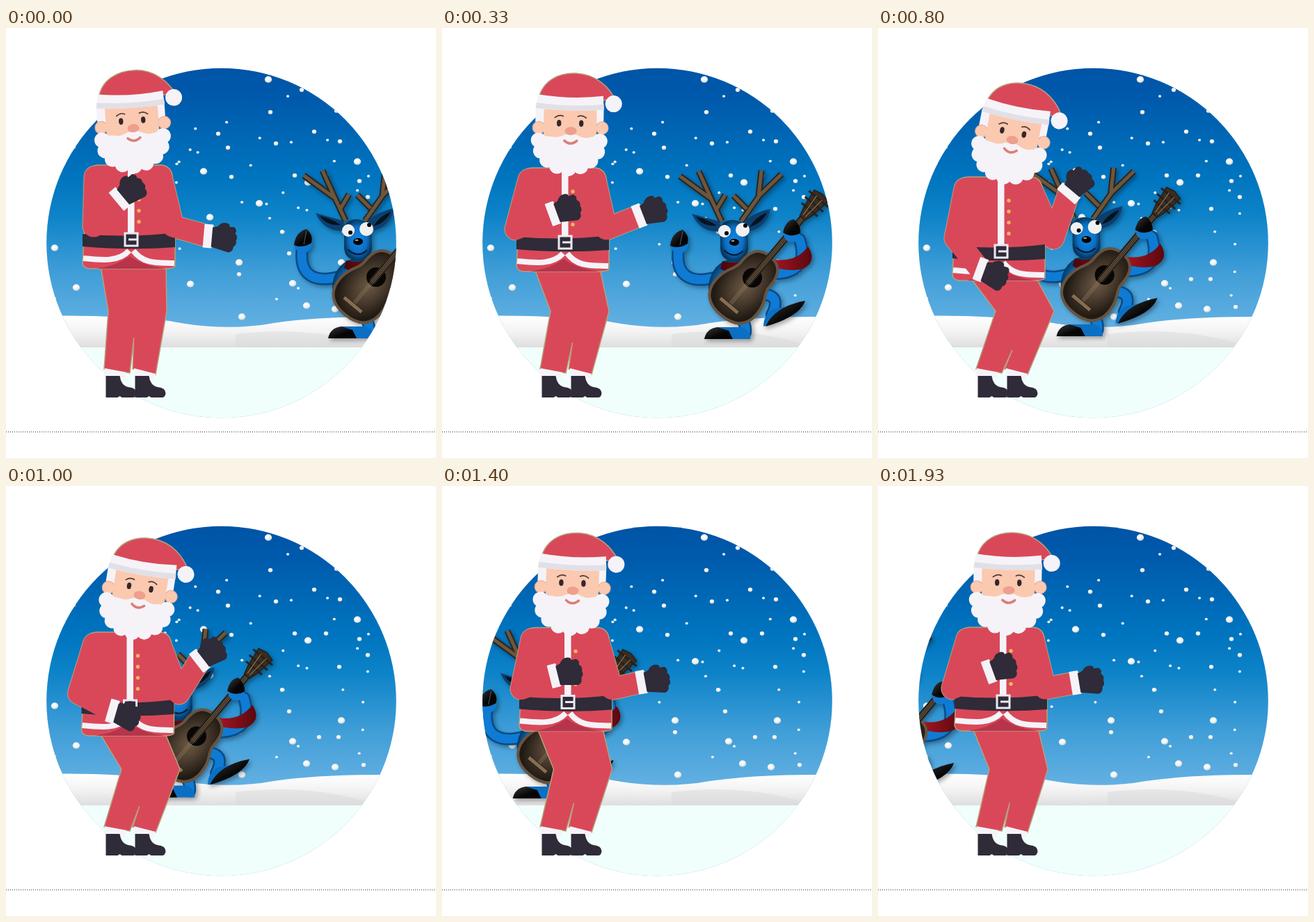
Write an HTML page that moves like this. It is 618 px wide and 618 px high and loops after 2.07 s.

```html
<!DOCTYPE html>
<html lang="en">
<head>
<meta charset="utf-8">
<title>Winter dance</title>
<style>
  html, body { margin: 0; width: 100%; height: 100%; overflow: hidden; background: #fff; }
  svg { display: block; width: 100vw; height: 100vh; }
  .line { fill: none; stroke-linecap: round; stroke-linejoin: round; }
  .butt { stroke-linecap: butt; }
  .red { fill: #d94859; }
  .dark { fill: #2f2b38; }
  .white { fill: #f5f3f8; }
  .edge { stroke: #b5a27c; stroke-width: 1.5; }
  .skin { fill: #fbc9b0; }
</style>
</head>
<body>
<svg viewBox="0 0 618 618">
  <defs>
    <clipPath id="disc"><circle cx="309.5" cy="309" r="251.3"/></clipPath>
    <linearGradient id="sky" gradientUnits="userSpaceOnUse" x1="0" y1="58" x2="0" y2="430">
      <stop offset="0" stop-color="#0054a6"/><stop offset=".12" stop-color="#005aac"/>
      <stop offset=".42" stop-color="#0075bf"/><stop offset=".56" stop-color="#0c82c8"/>
      <stop offset=".8" stop-color="#429fd8"/><stop offset="1" stop-color="#63b0e2"/>
    </linearGradient>
    <linearGradient id="hill" gradientUnits="userSpaceOnUse" x1="0" y1="414" x2="0" y2="459">
      <stop offset="0" stop-color="#fff"/><stop offset=".5" stop-color="#f3f3f3"/><stop offset="1" stop-color="#dedede"/>
    </linearGradient>
    <radialGradient id="flake" cx=".4" cy=".35" r=".65">
      <stop offset="0" stop-color="#fff"/><stop offset=".6" stop-color="#f2f2f0"/><stop offset="1" stop-color="#c9d3da"/>
    </radialGradient>
    <radialGradient id="fur">
      <stop offset="0" stop-color="#1687e6"/><stop offset=".65" stop-color="#0b6fc4"/><stop offset="1" stop-color="#05375f"/>
    </radialGradient>
    <radialGradient id="wood">
      <stop offset="0" stop-color="#6d5a45"/><stop offset=".5" stop-color="#4a3c2e"/><stop offset="1" stop-color="#211a14"/>
    </radialGradient>
    <linearGradient id="scarf"><stop offset="0" stop-color="#4a060c"/><stop offset=".6" stop-color="#a01420"/><stop offset="1" stop-color="#5a0810"/></linearGradient>
    <linearGradient id="hoof" x2="1" y2="1"><stop offset="0" stop-color="#3a3a3c"/><stop offset=".6" stop-color="#050505"/></linearGradient>
    <g id="glove">
      <rect class="white" x="-6" y="-17" width="13" height="34" rx="1"/>
      <path class="dark" d="M6-13L13-15Q18-22 25-21Q31-20 30-16L37-16Q42-12 39-7Q44-3 41 3Q43 9 38 12Q38 20 31 21L6 15Z"/>
    </g>
    <path id="boot" class="dark" d="M0 0H20Q22 14 32 16Q44 17 44 25Q43 31 39 31H23L20 29L17 31H0Z"/>
    <path id="horns" d="M-18-30L-32-60L-51-102M-78-95L-34-63M-13-68L-25-48M10-30L36-67L68-98M39-103L35-66M-1-67L18-48"/>
    <path id="limbs" d="M-80 8C-86 50-62 60-25 50M62 45Q108 42 94-4M42 75Q68 76 54 104M-6 100Q18 108 16 130"/>
  </defs>

  <g clip-path="url(#disc)">
    <rect width="618" height="618" fill="url(#sky)"/>
    <g id="snow" fill="url(#flake)"></g>
    <path d="M50 414C120 412 180 416 235 421Q315 437 385 424C450 415 510 415 570 415V470H50Z" fill="url(#hill)"/>
    <path d="M330 440Q430 428 515 453L520 459H330Z" fill="#d8d8d8" opacity=".45"/>
    <rect y="459" width="618" height="110" fill="#f1fffc"/>
    <g id="deer" style="filter:drop-shadow(3px 3px 3px rgba(0,0,0,.35))">
      <g class="line butt">
        <use href="#horns" stroke="#2e241b" stroke-width="9"/>
        <use href="#horns" stroke="#6b563f" stroke-width="5"/>
      </g>
      <path d="M-61-41Q-47-37-22-30L-16-16Q-48-12-61-41ZM52-48Q46-20 18-15L14-30Q28-43 52-48Z" fill="#0b3f70"/>
      <path d="M-55-37Q-36-32-25-24Q-45-22-55-37ZM47-43Q40-27 22-22Q30-36 47-43Z" fill="#06131f"/>
      <g class="line">
        <use href="#limbs" stroke="#084a86" stroke-width="18"/>
        <use href="#limbs" stroke="#0f7bd4" stroke-width="13"/>
      </g>
      <ellipse cx="-1" cy="66" rx="36" ry="42" fill="url(#fur)"/>
      <path d="M40 20Q84 36 106 6Q120 27 99 38Q76 44 46 32ZM-17 27Q0 32 20 24L28 40Q0 50-20 38Z" fill="url(#scarf)"/>
      <path d="M-43 139Q-40 124-22 122H12Q25 128 23 139ZM42 121Q42 104 56 96L72 93L68 112Z" fill="#0b6fc4"/>
      <path d="M-43 139Q-40 124-24 122L-8 127L-2 139Z" fill="url(#hoof)"/>
      <path d="M45 121Q58 92 102 84Q94 107 45 121Z" fill="url(#hoof)"/>
      <path d="M-20-22Q-15-32-4-32Q14-32 19-18L20 10Q18 27 0 27Q-20 26-20 8Z" fill="url(#fur)"/>
      <g fill="#f0f0f0"><circle cx="-14" cy="-16" r="9"/><circle cx="12" cy="-18" r="10"/></g>
      <circle cx="-11" cy="-13" r="3"/><circle cx="16" cy="-24" r="3"/>
      <ellipse rx="7" ry="5"/><ellipse cx="-2" cy="-2" rx="2.5" ry="1.2" fill="#999"/>
      <path class="line" d="M-14 12Q0 24 12 13" stroke="#03182c" stroke-width="2"/>
      <g transform="translate(26 51) rotate(-50)">
        <path d="M-70 0C-70-36-46-40-30-38C-10-36-8-27 6-27C30-28 40-18 40 0C40 18 30 28 6 27C-8 27-10 36-30 38C-46 40-70 36-70 0Z" fill="url(#wood)" stroke="#675440" stroke-width="4"/>
        <circle r="14" fill="#080706"/>
        <path d="M-10-5H116V5H-10Z" fill="#2b2119"/>
        <path d="M-52-2H150M-52 0H116M-52 2H150" stroke="#8f7a5d" stroke-width=".8"/>
        <rect x="-55" y="-17" width="6" height="34" fill="#856e52" stroke="#2a2018"/>
        <path d="M112-5L126-9L154-13L157 0L154 13L126 9L112 5Z" fill="#392c20" stroke="#1c150f"/>
        <path d="M128-15V15M138-17V17M148-18V18" stroke="#2a2018" stroke-width="3"/>
        <path d="M116-2L150-5M116 2L150 5" stroke="#8f7a5d"/>
      </g>
      <g fill="#1079d0"><circle cx="-79" cy="3" r="13"/><circle cx="83" cy="-12" r="12"/></g>
      <path d="M-92 5Q-90-14-74-18Q-64-10-67 2Q-80 10-92 5Z" fill="url(#hoof)"/>
      <path d="M-78 4L-74-16" stroke="#4e5d69"/>
      <path d="M70-14Q74-32 86-33Q96-24 95-13Q82-6 70-14Z" fill="url(#hoof)"/>
    </g>
  </g>
  <path d="M0 580.5H618" stroke="#333" stroke-dasharray="1 2"/>

  <path id="legs" class="red edge"/>
  <path class="white" d="M142 489L173 495L171 504L140 501ZM184 489L215 497L212 505L184 501Z"/>
  <use href="#boot" x="143.5" y="500"/><use href="#boot" x="185.5" y="500"/>
  <path id="armsEdge" class="line" stroke="#b5a27c" stroke-width="33"/>
  <g id="coat">
    <path class="red edge" d="M-66-90Q-63-107-46-107H44Q57-105 59-92L63-30V38Q61 42 50 42H-60Q-69 41-70 34L-67-20Z"/>
    <path d="M-50 42Q-22 38-2 24Q18 38 50 42Z" fill="#b7344b"/>
    <path class="line butt" d="M-69 27C-40 30-18 32-3 16M3 16C18 36 38 33 62 34" stroke="#f5f3f8" stroke-width="8"/>
    <rect class="white" x="-5" y="-106" width="9.5" height="96"/>
    <path class="dark" d="M-70-8Q0-2 63-10V11Q0 16-70 10Z"/>
    <g stroke="#ebe9ef" stroke-width="3">
      <rect class="dark" x="-9" y="-9" width="18" height="18"/>
      <path d="M-4 0H8"/>
    </g>
    <path class="line" d="M11-73V-25" stroke="#f1b55f" stroke-width="5.4" stroke-dasharray="0 15.8"/>
  </g>
  <path id="arms" class="line" stroke="#d94859" stroke-width="31"/>
  <use id="handL" href="#glove"/><use id="handR" href="#glove"/>
  <g id="head">
    <path class="white" d="M-51-36H47V-10H-51Z"/>
    <g class="skin" stroke="#e7a58f"><circle cx="-46" cy="-4" r="9"/><circle cx="45" cy="-5" r="9"/></g>
    <path class="skin" d="M-39-34H37V20H-39Z"/>
    <g id="beard" class="white"></g>
    <path class="skin" d="M-38-10H36V4Q24 14 10 6L0 3L-10 6Q-24 14-38 3Z"/>
    <path class="line" d="M-9 14Q0 22 9 14" stroke="#dc7f76" stroke-width="3.5"/>
    <ellipse rx="8.5" ry="6" fill="#ee9f8d"/>
    <path class="line" d="M-23-19Q-17-24-11-21M10-21Q16-24 22-19" stroke="#4c3b3d" stroke-width="1.7"/>
    <g id="eyesOpen" fill="#34272b"><ellipse cx="-17" cy="-11" rx="3.2" ry="4.7"/><ellipse cx="15" cy="-11" rx="3.2" ry="4.7"/></g>
    <path id="eyesShut" class="line" d="M-22-11Q-17-8-12-11M11-11Q16-8 21-11" stroke="#34272b" stroke-width="1.8"/>
    <path class="red edge" d="M-47-46C-41-73-17-84 8-83C34-82 54-65 64-45H45Z"/>
    <path class="white" d="M-48-52Q0-45 46-51L47-31Q0-27-51-32Z"/>
    <path d="M-50-40Q0-34 47-39V-31Q0-27-51-32Z" fill="#e1e0e6"/>
    <circle class="white" cx="61" cy="-40" r="12"/>
  </g>
</svg>
<script>
const $ = id => document.getElementById(id);
const DURATION = 2070, LAST_STEP = 29;

const flake = (x, y, r) => `<ellipse cx="${x}" cy="${y}" rx="${r}" ry="${r * .9}"/>`;
const pairs = (list, r) => list.map((x, i) => i % 2 ? '' : flake(x, list[i + 1], r)).join('');

const large = [377,74, 284,206, 434,222, 364,252, 505,192, 70,316, 482,337, 101,373, 265,368,
  412,367, 432,399, 473,404, 339,415, 293,272, 335,337];
const medium = [425,89, 380,121, 443,149, 388,166, 319,172, 460,212, 520,243, 479,260, 397,293,
  415,212, 480,163, 475,119, 478,361, 335,354, 450,361, 407,324, 305,152, 324,214, 508,220, 514,401];

let seed = 7;
const random = () => (seed = seed * 16807 % 2147483647) / 2147483647;
let small = '';
for (let i = 0; i < 40; i++) small += flake(70 + random() * 480, 80 + random() * 335, 2.1);
$('snow').innerHTML = small + pairs(medium, 3.2) + pairs(large, 5.2);

let curls = '<path d="M-46 6Q-20 12-8 4H6Q20 12 42 6L38 45L0 60L-40 45Z"/>';
for (let i = 0; i < 9; i++) {
  const a = Math.PI * i / 8;
  curls += `<circle cx="${44 * Math.cos(a) - 2}" cy="${14 + 40 * Math.sin(a)}" r="11"/>`;
}
$('beard').innerHTML = curls;

// step, nose x y, head tilt, buckle x, left elbow x, left wrist x y turn, right elbow x, right wrist x y, knee x, deer y
const poses = [
  [0,  183, 144, -4, 180, 126, 163, 246, -40, 240, 290, 299, 147, 307],
  [5,  185, 148, 1,  177, 106, 159, 267, -20, 236, 283, 270, 156, 308],
  [9,  190, 158, 8,  177, 104, 154, 322, 40,  250, 276, 248, 165, 312],
  [12, 193, 161, 11, 177, 111, 147, 347, 20,  252, 274, 238, 169, 304],
  [18, 191, 153, 7,  180, 98,  158, 300, 12,  245, 282, 265, 163, 313],
  [24, 185, 148, -3, 182, 130, 163, 246, -40, 243, 290, 299, 158, 307],
  [29, 188, 150, 1,  180, 107, 159, 267, -20, 240, 283, 283, 160, 314]
];

function poseAt(step) {
  const next = Math.max(1, poses.findIndex(p => p[0] >= step));
  const a = poses[next - 1], b = poses[next];
  const k = (step - a[0]) / (b[0] - a[0]);
  return a.map((v, i) => v + (b[i] - v) * k);
}

function stepAt(time) {
  let step = 0;
  while (step < LAST_STEP && Math.round((step + 1) * 20 / 3) * 10 <= time) step++;
  return step;
}

function place(id, x, y, turn = 0) {
  $(id).setAttribute('transform', `translate(${x} ${y}) rotate(${turn})`);
}

function draw(time) {
  const step = stepAt(time);
  const [, nx, ny, tilt, bx, lex, lwx, lwy, lTurn, rex, rwx, rwy, knee, deerY] = poseAt(step);
  const by = ny + 160, shoulder = by - 90, elbow = by - 19, hip = by + 38;

  place('deer', 506 - 17.2 * step, deerY);
  place('head', nx, ny, tilt);
  place('coat', bx, by);
  place('handL', lwx, lwy, lTurn);
  place('handR', rwx, rwy, 5 - (299 - rwy) * .9);

  const arms = `M${bx - 52} ${shoulder}L${lex} ${elbow}L${lwx} ${lwy}` +
    `M${bx + 43} ${shoulder}L${rex} ${elbow}L${rwx} ${rwy}`;
  $('arms').setAttribute('d', arms);
  $('armsEdge').setAttribute('d', arms);

  const crotchX = knee * .42 + 122, crotchY = 445 + (knee - 147) * .8;
  $('legs').setAttribute('d', `M${bx - 44} ${hip}L${knee} 407L141 490L178 496L${crotchX} ${crotchY}` +
    `L182 490L215 498L${knee + 84} 407L${bx + 50} ${hip}Z`);

  const shut = step >= 23 && step <= 25;
  $('eyesOpen').style.display = shut ? 'none' : '';
  $('eyesShut').style.display = shut ? '' : 'none';
}

function tick() {
  draw(performance.now() % DURATION);
  requestAnimationFrame(tick);
}
tick();
</script>
</body>
</html>
```
